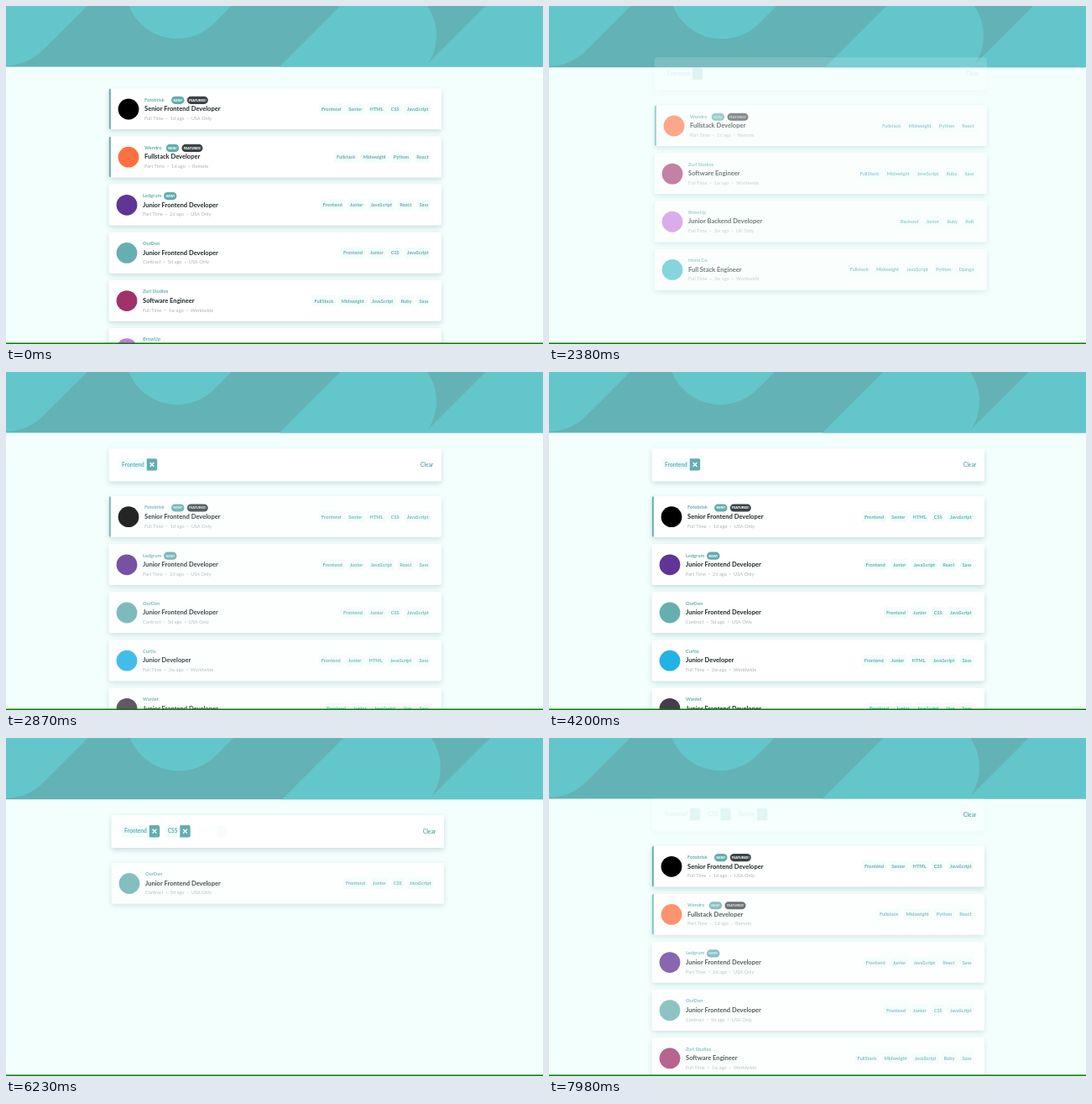
An HTML page with a canvas for the animation above (8000 ms loop, 640x403 px).

```html
<!DOCTYPE html>
<html lang="en">
<head>
<meta charset="utf-8">
<title>Job listings</title>
<style>
  html, body { margin: 0; width: 100%; height: 100%; overflow: hidden; }
  canvas { display: block; width: 640px; height: 403px; }
</style>
</head>
<body>
<canvas></canvas>
<script>
const canvas = document.querySelector('canvas');
const ctx = canvas.getContext('2d');
const LOOP = 8000, EXIT = 310, ENTER = 400, CLEAR_AT = 7780;
const TEAL = '#62adaf', DARK = '#3a4447', PALE = '#f2fdfc', PAGE = '#f3fffd';
const CARD = { x: 122.8, width: 396, height: 48.5, pitch: 57.15 };
const BAR_Y = 91.2, LIST_Y = 148.2, CLOSED = -49.7;

// badgeX: left edge of the "NEW!" badge, measured from the company name
const job = (company, logo, title, meta, tags, badgeX = 0, featured = false) =>
  ({ company, logo, title, meta: meta.split('|'), tags: tags.split(' '), badgeX, featured });

const jobs = [
  job('Fotobrisk', '#000', 'Senior Frontend Developer', 'Full Time|1d ago|USA Only',
    'Frontend Senior HTML CSS JavaScript', 32, true),
  job('Wendro', '#fd7040', 'Fullstack Developer', 'Part Time|1d ago|Remote',
    'Fullstack Midweight Python React', 25.7, true),
  job('Ledgrum', '#5f3595', 'Junior Frontend Developer', 'Part Time|2d ago|USA Only',
    'Frontend Junior JavaScript React Sass', 25),
  job('OurDen', '#67afaf', 'Junior Frontend Developer', 'Contract|5d ago|USA Only',
    'Frontend Junior CSS JavaScript'),
  job('Zurl Studios', '#a0326a', 'Software Engineer', 'Full Time|1w ago|Worldwide',
    'FullStack Midweight JavaScript Ruby Sass'),
  job('BrowUp', '#c678e0', 'Junior Backend Developer', 'Full Time|2w ago|UK Only',
    'Backend Junior Ruby RoR'),
  job('Curtlo', '#22b2e6', 'Junior Developer', 'Full Time|2w ago|Worldwide',
    'Frontend Junior HTML JavaScript Sass'),
  job('Wardet', '#463c4c', 'Junior Frontend Developer', 'Full Time|2w ago|USA Only',
    'Frontend Junior JavaScript Vue Sass'),
  job('Irisno Co.', '#3fbac6', 'Full Stack Engineer', 'Full Time|3w ago|Worldwide',
    'Fullstack Midweight JavaScript Python Django'),
  job('The Mist Sieve Company', '#5b9fa8', 'Front-end Dev', 'Part Time|1mo ago|Worldwide',
    'Frontend Junior React Sass JavaScript'),
];
const filters = [
  { tag: 'Frontend', at: 2314 },
  { tag: 'CSS', at: 4350 },
  { tag: 'Senior', at: 6200 },
];

const progress = (t, start, duration) => Math.min(1, Math.max(0, (t - start) / duration));
const easeOut = p => 1 - (1 - p) ** 2;
const easeInOut = p => p < .5 ? 2 * p * p : 1 - 2 * (1 - p) ** 2;

function box(x, y, w, h, r, color) {
  ctx.fillStyle = color;
  ctx.beginPath();
  ctx.roundRect(x, y, w, h, r);
  ctx.fill();
}

function disc(x, y, r, color) {
  ctx.fillStyle = color;
  ctx.beginPath();
  ctx.arc(x, y, r, 0, 2 * Math.PI);
  ctx.fill();
}

function setFont(size, weight = 700) {
  ctx.font = `${weight} ${size}px Lato, sans-serif`;
}

function text(string, x, y, size, color, weight, align = 'left') {
  setFont(size, weight);
  ctx.textAlign = align;
  ctx.fillStyle = color;
  ctx.fillText(string, x, y);
  return ctx.measureText(string).width;
}

// The shadow is kept outside the panel so it never shows through a fading one
function panel(y, height) {
  ctx.save();
  ctx.beginPath();
  ctx.rect(0, 0, 640, 403);
  ctx.roundRect(CARD.x, y, CARD.width, height, 2);
  ctx.clip('evenodd');
  ctx.shadowColor = 'rgba(60, 110, 115, .24)';
  ctx.shadowBlur = 6 * ratio;
  ctx.shadowOffsetY = 2.6 * ratio;
  box(CARD.x, y, CARD.width, height, 2, '#fff');
  ctx.restore();
  box(CARD.x, y, CARD.width, height, 2, '#fff');
}

function header(scale) {
  // Slanted pill: round end at (x, y), body running along the 45° diagonal
  const pill = (x, y, direction) => {
    ctx.beginPath();
    ctx.moveTo(x, y);
    ctx.lineTo(x + 300 * direction, y - 300 * direction);
    ctx.stroke();
  };
  ctx.save();
  ctx.scale(scale, scale);
  ctx.beginPath();
  ctx.rect(0, 0, 640, 72.6);
  ctx.clip();
  ctx.fillStyle = '#63b2b5';
  ctx.fillRect(0, 0, 640, 73);
  ctx.strokeStyle = ctx.fillStyle = '#63c6ca';
  ctx.lineWidth = 124;
  ctx.lineCap = 'round';
  pill(0, 9, 1);
  pill(204, -23, 1);
  pill(451, 35, -1);
  ctx.beginPath();
  ctx.moveTo(571.5, 0);
  ctx.lineTo(640, 0);
  ctx.lineTo(640, 73);
  ctx.lineTo(498.5, 73);
  ctx.fill();
  ctx.restore();
}

function badge(label, x, y, width, color) {
  box(x, y, width, 9.2, 4.6, color);
  text(label, x + width / 2, y + 6, 3.8, '#fff', 900, 'center');
}

function card(item, y, alpha) {
  const inset = item.featured ? 2 : 0;
  const left = CARD.x + 40.2 + inset;
  ctx.globalAlpha = alpha;
  panel(y, CARD.height);
  if (item.featured) box(CARD.x, y, 2, CARD.height, [2, 0, 0, 2], TEAL);
  disc(CARD.x + 21.2 + inset, y + 24.5, 12.4, item.logo);

  text(item.company, left, y + 15.2, 5.7, TEAL);
  if (item.badgeX) badge('NEW!', left + item.badgeX, y + 9.2, 15.5, TEAL);
  if (item.featured) badge('FEATURED!', left + item.badgeX + 18.8, y + 9.2, 25, DARK);
  text(item.title, left, y + 26.7, 7.55, '#1d2a2a');

  let x = left;
  item.meta.forEach((part, i) => {
    if (i) {
      disc(x + 4.1, y + 35.6, .65, '#b2bbbb');
      x += 8.2;
    }
    x += text(part, x, y + 37.4, 5.65, '#a9b3b3', 400);
  });

  let right = CARD.x + CARD.width - 15.3;
  for (const tag of [...item.tags].reverse()) {
    setFont(5.7);
    const width = ctx.measureText(tag).width;
    box(right - width - 2.8, y + 17.8, width + 5.6, 13.2, 1.5, PALE);
    text(tag, right, y + 26.4, 5.7, TEAL, 700, 'right');
    right -= width + 9.1;
  }
  ctx.globalAlpha = 1;
}

function filterBar({ chips, barAlpha, clearAlpha }, y) {
  ctx.globalAlpha = barAlpha;
  panel(y, 39);
  ctx.globalAlpha = clearAlpha;
  text('Clear', CARD.x + 386.5, y + 21.7, 6.7, TEAL, 700, 'right');
  let x = CARD.x + 12;
  for (const chip of chips) {
    ctx.globalAlpha = chip.alpha;
    setFont(6.6);
    const width = ctx.measureText(chip.tag).width + 6.3;
    box(x, y + 12, width, 14.4, [2, 0, 0, 2], PALE);
    text(chip.tag, x + 3.3, y + 21.4, 6.6, TEAL);
    box(x + width, y + 12, 12.4, 14.4, [0, 2, 2, 0], TEAL);
    const cx = x + width + 6.2, cy = y + 19.2;
    ctx.strokeStyle = '#fff';
    ctx.lineWidth = 1.4;
    ctx.lineCap = 'butt';
    ctx.beginPath();
    for (const s of [-1, 1]) {
      ctx.moveTo(cx - 2.4, cy - 2.4 * s);
      ctx.lineTo(cx + 2.4, cy + 2.4 * s);
    }
    ctx.stroke();
    x += width + 18.6;
  }
  ctx.globalAlpha = 1;
}

function stateAt(t) {
  const active = filters.filter(f => t >= f.at);
  const matches = (item, list) => list.every(f => item.tags.includes(f.tag));
  if (!active.length) {
    return { list: jobs, alpha: () => 1, shift: CLOSED, barAlpha: 0, clearAlpha: 0, chips: [] };
  }

  if (t >= CLEAR_AT) {
    const fadeIn = easeOut(progress(t, CLEAR_AT, ENTER));
    const fadeOut = 1 - easeOut(progress(t, CLEAR_AT, EXIT));
    return {
      list: jobs,
      alpha: item => matches(item, active) ? 1 : fadeIn,
      shift: CLOSED * easeInOut(progress(t, CLEAR_AT, 455)),
      barAlpha: fadeOut,
      clearAlpha: 1,
      chips: active.map(f => ({ tag: f.tag, alpha: fadeOut })),
    };
  }

  // Rejected cards fade out first, then the matching ones fade in
  const last = active[active.length - 1];
  const leaving = t < last.at + EXIT;
  const list = leaving
    ? jobs.filter(item => matches(item, active.slice(0, -1)) && !matches(item, [last]))
    : jobs.filter(item => matches(item, active));
  const alpha = leaving
    ? 1 - easeOut(progress(t, last.at, EXIT))
    : easeOut(progress(t, last.at + EXIT, ENTER));
  const opened = easeOut(progress(t, filters[0].at, EXIT));
  return {
    list,
    alpha: () => alpha,
    shift: CLOSED * (1 - opened),
    barAlpha: opened ** 2,
    clearAlpha: opened ** 2,
    chips: active.map(f => ({ tag: f.tag, alpha: easeOut(progress(t, f.at, EXIT)) ** 2 })),
  };
}

function render(t) {
  const state = stateAt(t);
  const scrolls = state.list.length > 4;
  ctx.fillStyle = PAGE;
  ctx.fillRect(0, 0, 640, 403);
  header(scrolls ? 1 : 640 / 634);

  // Short pages lose their scrollbar, so the content re-centres
  ctx.save();
  if (!scrolls) ctx.translate(3, .8);
  if (state.chips.length) filterBar(state, BAR_Y + state.shift);
  state.list.forEach((item, i) =>
    card(item, LIST_Y + state.shift + i * CARD.pitch, state.alpha(item)));
  ctx.restore();

  ctx.fillStyle = '#008000';
  ctx.fillRect(0, 401.5, 640, 1.5);
}

const ratio = window.devicePixelRatio || 1;
canvas.width = 640 * ratio;
canvas.height = 403 * ratio;
ctx.scale(ratio, ratio);

const start = performance.now();
function tick() {
  render((performance.now() - start) % LOOP);
  requestAnimationFrame(tick);
}
tick();
</script>
</body>
</html>
```
